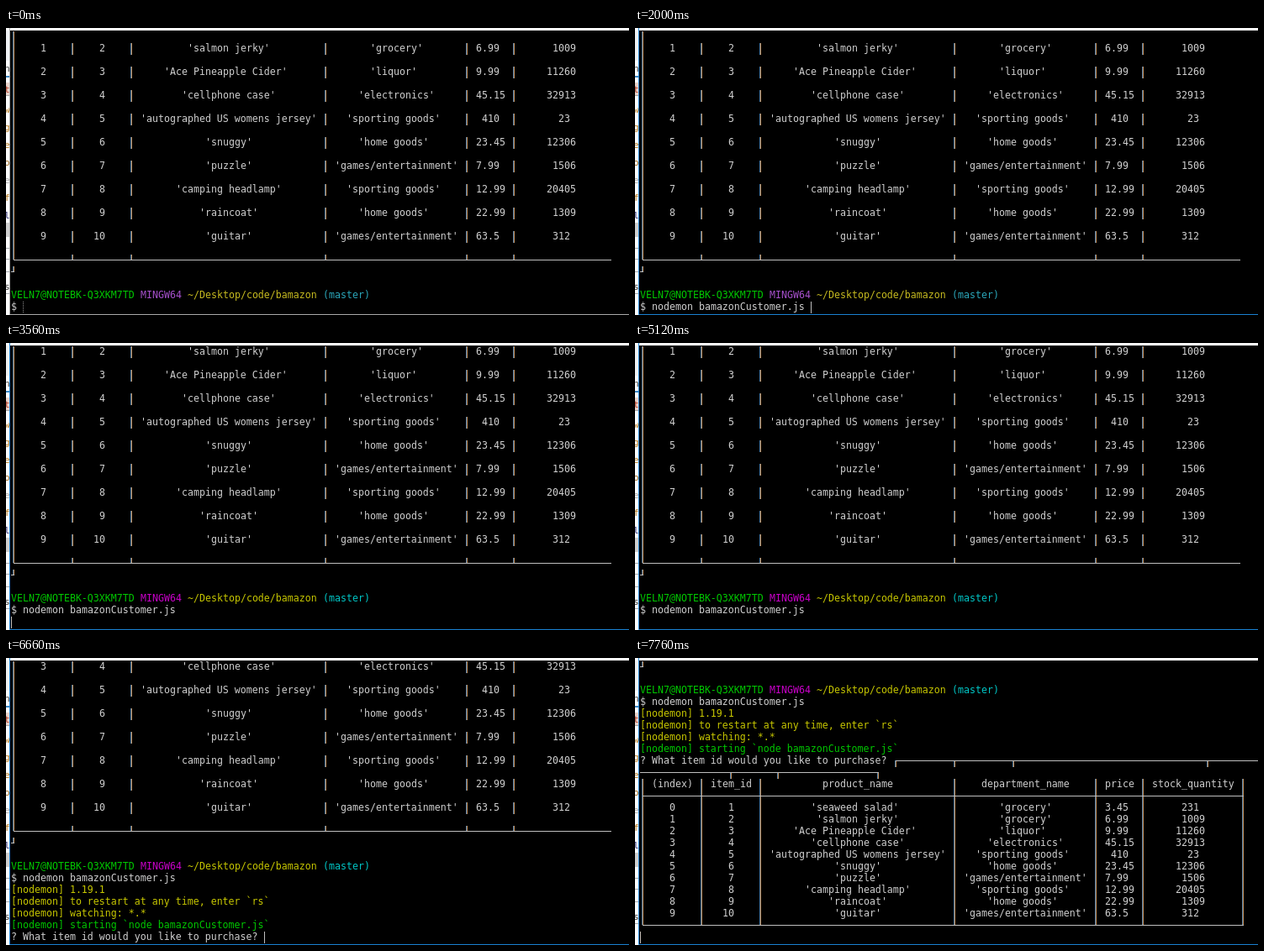
Recreate the animation shown at these times as an HTML page. Size 741x342 px, loop 8 s.

```html
<!DOCTYPE html>
<html lang="en">
<head>
<meta charset="utf-8">
<title>Terminal session</title>
<style>
html, body { margin: 0; width: 100%; height: 100%; overflow: hidden; background: #000; }
svg { display: block; width: 741px; height: 342px; }
text {
  font: 11.627px "DejaVu Sans Mono", "Liberation Mono", monospace;
  white-space: pre;
  fill: #d0d0d0;
}
.edge text { font-size: 11px; }
</style>
</head>
<body>
<svg id="stage" viewBox="0 0 741 342" xmlns="http://www.w3.org/2000/svg"></svg>
<script>
const LOOP = 8000, CW = 7, RH = 14, LEFT = 6, TOP = 4;
const stage = document.getElementById('stage');
const GREEN = '#00c800', YELLOW = '#c8c800', GRAY = '#bfbfbf';

function add(parent, tag, attrs = {}, content) {
  const el = document.createElementNS('http://www.w3.org/2000/svg', tag);
  for (const k in attrs) el.setAttribute(k, attrs[k]);
  if (content !== undefined) el.textContent = content;
  parent.appendChild(el);
  return el;
}
const rect = (p, x, y, width, height, fill) => add(p, 'rect', { x, y, width, height, fill });
const show = (el, on) => el.setAttribute('display', on ? 'inline' : 'none');

const colX = c => LEFT + c * CW;
const midX = c => colX(c) + 3;
const rowY = r => TOP + r * RH;

function print(p, row, col, str, fill) {
  const el = add(p, 'text', { x: colX(col), y: rowY(row) + 10 }, str);
  if (fill) el.style.fill = fill;
  return el;
}

// Terminal background and scrolling content
rect(stage, 0, 0, 741, 342, '#fff');
rect(stage, 5, 3, 736, 338, '#000');
const defs = add(stage, 'defs');
rect(add(defs, 'clipPath', { id: 'screen' }), 5, 4, 736, 337);
const screen = add(stage, 'g', { 'clip-path': 'url(#screen)' });
const buffer = add(screen, 'g');

// Table drawing
const BARS = [0, 10, 20, 53, 77, 85, 102];
const HEADS = ['(index)', 'item_id', 'product_name', 'department_name', 'price', 'stock_quantity'];
const ITEMS = [
  ['seaweed salad', 'grocery', '3.45', '231'],
  ['salmon jerky', 'grocery', '6.99', '1009'],
  ['Ace Pineapple Cider', 'liquor', '9.99', '11260'],
  ['cellphone case', 'electronics', '45.15', '32913'],
  ['autographed US womens jersey', 'sporting goods', '410', '23'],
  ['snuggy', 'home goods', '23.45', '12306'],
  ['puzzle', 'games/entertainment', '7.99', '1506'],
  ['camping headlamp', 'sporting goods', '12.99', '20405'],
  ['raincoat', 'home goods', '22.99', '1309'],
  ['guitar', 'games/entertainment', '63.5', '312']
];
const record = i => {
  const [name, dept, price, qty] = ITEMS[i];
  return [`${i}`, `${i + 1}`, `'${name}'`, `'${dept}'`, price, qty];
};

function cells(p, row, values) {
  values.forEach((v, i) => {
    const room = BARS[i + 1] - BARS[i] - 1;
    print(p, row, BARS[i] + 1 + Math.floor((room - v.length) / 2), v);
  });
}
// A vertical stroke falls between two pixels and takes a colour fringe
function bar(p, row, col, y = 0, h = RH) {
  rect(p, midX(col) - 1, rowY(row) + y, 1, h, '#4f7fa8');
  rect(p, midX(col), rowY(row) + y, 1, h, '#c8925c');
}
const bars = (p, row, count, y, h) =>
  BARS.slice(0, count).forEach(col => bar(p, row, col, y, h));
const rule = (p, row, x1, x2) => rect(p, x1, rowY(row) + 6, x2 - x1, 1, GRAY);

// Earlier table, wrapped at 102 columns
bar(buffer, 0, 0);
for (let i = 1; i < 10; i++) {
  const row = 2 * i - 1;
  cells(buffer, row, record(i));
  bars(buffer, row, 6);
  bar(buffer, row + 1, 0);
}
bars(buffer, 19, 6, 0, 6);
rule(buffer, 19, midX(0), colX(102));
bar(buffer, 20, 0, 0, 6);
rule(buffer, 20, LEFT, midX(0) + 1);

// Prompt and command
print(buffer, 22, 0, 'VELN7@NOTEBK-Q3XKM7TD', GREEN);
const system = print(buffer, 22, 22, 'MINGW64');
const path = print(buffer, 22, 30, '~/Desktop/code/bamazon');
const branch = print(buffer, 22, 53, '(master)');
print(buffer, 23, 0, '$');
const command = print(buffer, 23, 2, 'nodemon bamazonCustomer.js');

const startup = add(buffer, 'g');
['1.19.1', 'to restart at any time, enter `rs`', 'watching: *.*',
 'starting `node bamazonCustomer.js`'].forEach((s, i) =>
  print(startup, 24 + i, 0, '[nodemon] ' + s, i < 3 ? YELLOW : GREEN));

const question = print(buffer, 28, 0, '? What item id would you like to purchase?');

// Fresh table; its top border starts after the question and wraps at 105 columns
const table = add(buffer, 'g');
BARS.forEach(b => {
  const c = b + 43;
  bar(table, c < 105 ? 28 : 29, c % 105, 6, 8);
});
rule(table, 28, midX(43), 741);
rule(table, 29, LEFT, midX(40) + 1);
cells(table, 30, HEADS);
bars(table, 30, 7);
bars(table, 31, 7);
for (let i = 0; i < 10; i++) {
  cells(table, 32 + i, record(i));
  bars(table, 32 + i, 7);
}
bars(table, 42, 7, 0, 6);
[31, 42].forEach(row => rule(table, row, midX(0), midX(102) + 1));

const caret = rect(screen, LEFT, 326, 1, 14, GRAY);
const idleCaret = add(screen, 'path', {
  d: 'M20.5 326v14', stroke: '#8c8c8c', 'stroke-dasharray': '1 1'
});

// Slivers of the window behind, and the window border
rect(add(defs, 'clipPath', { id: 'sliver' }), 0, 0, 5, 342);
const edge = add(stage, 'g', { class: 'edge', 'clip-path': 'url(#sliver)' });
rect(edge, 0, 3, 5, 36, '#f1f3f5');
rect(edge, 0, 57, 5, 2, '#3d87c4');
rect(edge, 0, 65, 5, 15, '#e9d4cc');
rect(edge, 0, 80, 5, 1, '#a7a7a7');
rect(edge, 0, 232, 5, 17, '#d0d0d0');
[262, 275, 290, 316].forEach(y => rect(edge, 0, y, 5, 1, '#a9adb2'));
[['n', 52, '#333'], ['t', 77, '#b33a24'], ['w', 101, '#b7791c'], ['g', 122, '#b7791c'],
 ['e', 143, '#b7791c'], ['o', 164, '#a06a20'], ['e', 185, '#aaa'], ['f', 206, '#b7791c'],
 ['l', 227, '#28286e'], ['s', 312, '#333']
].forEach(([s, y, c]) => {
  add(edge, 'text', { x: -2, y }, s).style.fill = c;
});
const border = add(stage, 'path', { d: 'M4.5 0V341.5H741', fill: 'none' });

// Mouse pointer with highlight
const mouse = add(stage, 'g');
const halo = add(mouse, 'circle', { r: 11.5, fill: '#a39405' });
add(mouse, 'path', {
  d: 'M-1 -7.5h3M4 -7.5h3M3.5 -7v15M-1 8.5h3M4 8.5h3',
  stroke: '#f2f2f2', fill: 'none'
});

// Caret state changes: time, column, visible
const CARET = [
  [1070, 2, 1], [1620, 2, 0], [2000, 29, 1], [2460, 29, 0], [3010, 29, 1],
  [3560, 0, 1], [4020, 0, 0], [4570, 0, 1], [5120, 0, 0], [5190, 0, 1],
  [5650, 0, 0], [6200, 0, 1], [6660, 43, 1], [6750, 0, 1], [7210, 0, 0], [7760, 0, 1]
];

function drawMouse(t) {
  show(mouse, t >= 140 && t < 2000);
  show(halo, t < 1140);
  let x = 493, y = 330;
  if (t < 1070) {
    const step = Math.min(9, Math.floor((t - 140) / 77.7));
    const k = 1 - Math.pow(1 - Math.max(0, step) / 9, 2);
    x = 560 - 55 * k;
    y = 346 - 17 * k;
  }
  mouse.setAttribute('transform', `translate(${Math.round(x)} ${Math.round(y)})`);
}

function draw(t) {
  const active = t >= 1070, entered = t >= 3560;
  const scroll = t < 3560 ? 0 : t < 5190 ? 1 : t < 6750 ? 5 : 20;
  buffer.setAttribute('transform', `translate(0 ${-scroll * RH})`);
  show(command, t >= 2000);
  show(startup, t >= 5190);
  show(question, t >= 6660);
  show(table, t >= 6750);

  system.style.fill = entered ? '#c800c8' : '#a650cc';
  path.style.fill = entered ? YELLOW : '#c8bc20';
  branch.style.fill = entered ? '#00c8c8' : '#2ba8bc';
  border.setAttribute('stroke', active ? '#1a80d0' : '#a8a8a8');

  const state = CARET.filter(c => c[0] <= t).pop();
  show(idleCaret, !state);
  show(caret, state && state[2]);
  if (state) caret.setAttribute('x', colX(state[1]));
  drawMouse(t);
}

const start = performance.now();
function loop() {
  draw((performance.now() - start) % LOOP);
  requestAnimationFrame(loop);
}
draw(0);
requestAnimationFrame(loop);
</script>
</body>
</html>
```
